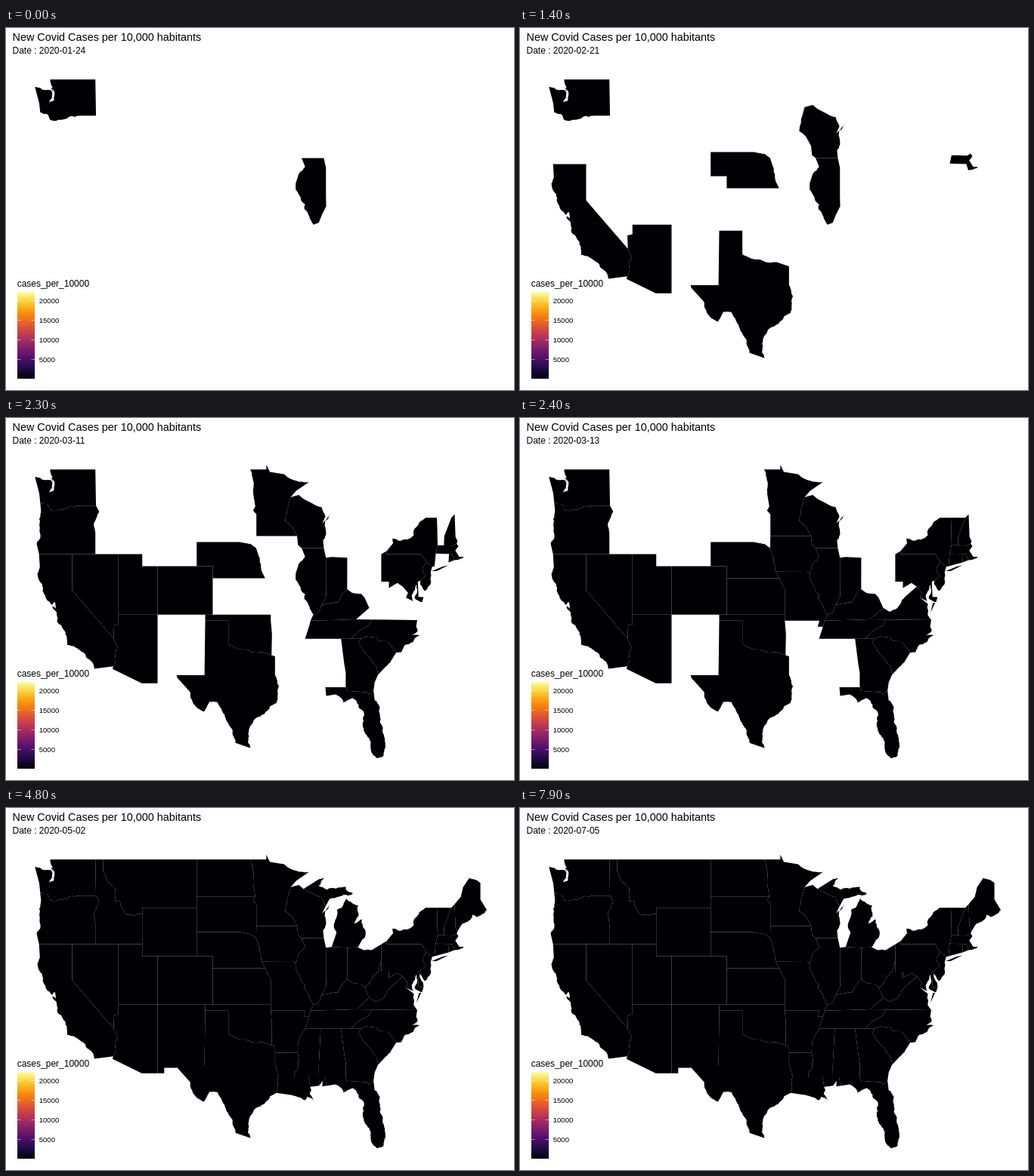
These frames come from a looping animation (672 px wide and 480 px high, 8000 ms). An HTML page:

```html
<!DOCTYPE html>
<html lang="en">
<head>
<meta charset="utf-8">
<title>New Covid Cases per 10,000 habitants</title>
<style>
  html, body { margin: 0; width: 100%; height: 100%; overflow: hidden; background: #fff; }
  svg { display: block; width: 672px; height: 480px; }
  text { font: 12px "Liberation Sans", Arial, sans-serif; fill: #000; }
  .title { font-size: 14.4px; }
  .ticks text { font-size: 9.6px; }
  #map { fill: #000004; }
</style>
</head>
<body>
<svg viewBox="0 0 672 480">
  <defs>
    <linearGradient id="inferno" x1="0" y1="1" x2="0" y2="0">
      <stop offset="0" stop-color="#000004"/>
      <stop offset=".125" stop-color="#210c4a"/>
      <stop offset=".25" stop-color="#57106d"/>
      <stop offset=".375" stop-color="#8a226a"/>
      <stop offset=".5" stop-color="#bc3754"/>
      <stop offset=".625" stop-color="#e45a31"/>
      <stop offset=".75" stop-color="#f98c0a"/>
      <stop offset=".875" stop-color="#f9c932"/>
      <stop offset="1" stop-color="#fcffa4"/>
    </linearGradient>
  </defs>
  <text class="title" x="8.5" y="17">New Covid Cases per 10,000 habitants</text>
  <text id="date" x="8.5" y="34">Date : 2020-01-24</text>
  <g id="map"></g>
  <text x="14.7" y="343">cases_per_10000</text>
  <rect x="15" y="350" width="23" height="115" fill="url(#inferno)"/>
  <g class="ticks" id="ticks"></g>
</svg>
<script>
  // Borders as degrees west and north. Each is given once and shared by its neighbours.
  const west = {
    coastPuget: [122.76,49, 122.5,48.4, 122.2,47.95, 122.4,47.2, 122.9,47.1, 122.5,47.9, 122.7,48.12, 123.5,48.13, 124.72,48.38],
    coastWA: [124.4,47.6, 124.15,46.9],
    isle: [122.7,48.38, 122.4,47.95, 122.5,48.25],
    riverColumbia: [124.05,46.27, 123.2,46.15, 122.76,45.65, 122.2,45.57, 121.2,45.68, 119,46],
    lewis: [116.92,46], waNE: [117,49], idNE: [116.01,49],
    coastOR: [123.95,45.6, 124.1,44.2, 124.5,42.85],
    orCa: [124.2,42], orNv: [119.97,42], orId: [117,42], utNW: [114.05,42],
    riverSnake: [117,43.8, 117.2,44.4, 116.85,45, 116.5,45.5],
    coastCA: [124.1,41, 124.4,40.4, 123.8,39.5, 123.7,38.9, 122.98,38.1, 122.5,37.8, 122.2,38.05, 122.1,37.5, 122.5,37.7, 121.9,36.9, 121.9,36.5, 120.65,35.15, 120.6,34.5, 119.2,34.15, 118.4,33.8, 117.25,32.9],
    caS: [117.12,32.53],
    riverColorado: [114.72,32.72, 114.5,33, 114.53,33.9, 114.15,34.27],
    needle: [114.63,35], tahoe: [119.97,39], mead: [114.7,36.1, 114.05,36.2],
    utSW: [114.05,37], four: [109.05,37], azSE: [109.05,31.33], azS: [111.07,31.33, 114.81,32.5],
    bear: [111.01,42], flame: [111.01,41]
  };
  const plains = {
    coNW: [109.05,41], coNE: [102,41], coSE: [102,37],
    nmNE: [102.96,37], okSW: [102.96,36.5], nmSE: [103.05,32], paso: [106.62,32, 106.53,31.78], heel: [108.2,31.78, 108.2,31.33],
    wyNW: [111.01,45], wyNE: [104.05,45], neW: [104.05,41], neNW: [104.05,43],
    riverBitter: [116.01,48, 114.5,46.65, 114.5,45.55, 113.9,45.6, 113,44.45, 111.01,44.5],
    ndNW: [104.05,49], sdNW: [104.05,45.94], riverRed: [97.23,49, 96.8,46.9], fargo: [96.56,45.94],
    stone: [96.85,45.6, 96.42,45.3], iaNW: [96.42,43.5], sioux: [96.45,42.49],
    riverNE: [97.2,42.85, 98.5,43], riverOmaha: [96.1,41.8, 95.85,40.9], iaSW: [95.75,40.58],
    ksNE: [95.3,40], ksNW: [102,40], kc: [95,39.6, 94.58,39.1],
    okNE: [94.58,37], arNW: [94.58,36.5], okE: [94.43,35.4], okSE: [94.48,33.64],
    riverTX: [95.6,33.9, 96.9,33.88, 98.1,34.13, 100,34.56], pan: [100,36.5]
  };
  const south = {
    txNE: [94.04,33.55], laNW: [94.04,33.02], riverSabine: [94.04,32, 93.55,31.1, 93.7,30.3, 93.85,29.7],
    coastTX: [94.7,29.4, 95.3,28.9, 97.2,27.8, 97.4,26.9, 97.15,25.96],
    riverGrande: [99.1,26.4, 99.5,27.5, 100.3,28.3, 101.4,29.77, 102.4,29.8, 103.1,28.98, 104.5,29.65, 104.9,30.6],
    bootN: [90.15,36.5], bootS: [90.38,36], tnW: [89.7,36], memphis: [90.2,35],
    riverAR: [90.6,34.6, 91.1,33.8], arSE: [91.15,33], riverLA: [90.95,32.4, 91.6,31], pearl: [89.73,31, 89.55,30.2],
    coastLA: [89.4,29.9, 89.6,29.6, 89.1,29.05, 89.9,29.4, 90.2,29.1, 91.3,29.4, 92.2,29.55],
    msNE: [88.2,35], msE: [88.45,31.9, 88.4,30.3], mobile: [88,30.25, 87.95,30.7],
    gaNW: [85.6,35], gaW: [85.18,32.87, 85,32.2], alSE: [85,31], perdido: [87.6,31, 87.5,30.28],
    ncSW: [84.32,35], scNW: [83.1,35], riverSavannah: [83.35,34.7, 81.5,33, 80.88,32.03],
    coastGA: [81.3,31.4], gaS: [81.45,30.71, 82.05,30.36, 82.2,30.57, 84.86,30.7],
    coastFL: [81.3,29.9, 80.55,28.4, 80.03,26.8, 80.2,25.3, 81.1,25.15, 81.8,26.1, 82.7,27.6, 82.65,28.8, 83.6,29.8, 84.1,30.1, 85.3,29.7, 86.3,30.4]
  };
  const lakes = {
    tnNW: [89.5,36.5], cumber: [83.68,36.6], cairo: [89.15,37], riverPaducah: [88.45,37.15], wabash: [88.05,37.8],
    riverOhio: [87,37.95, 86,38, 85.4,38.7], cinci: [84.82,39.1], riverKY: [84.2,38.8, 83,38.7], sandy: [82.6,38.42], kyE: [82,37.55],
    ilNW: [90.64,42.5], ilNE: [87.8,42.5], chicago: [87.53,41.7], inW: [87.53,39.35], riverIN: [87.5,38.5],
    riverIL: [89.5,37.4, 90.3,38.3, 90.2,38.7, 90.7,39, 91.4,39.9], keokuk: [91.4,40.4], riverIA: [91,41.2, 90.2,41.8],
    iaSE: [91.73,40.6], iaNE: [91.22,43.5], dubuque: [91.1,42.75],
    miSW: [86.8,41.76], ohNW: [84.81,41.7], toledo: [83.45,41.73], coastOH: [82.7,41.5, 81.7,41.5],
    duluth: [92.05,46.7], coastWI: [91,46.9], iron: [90.4,46.57], riverWI: [89.1,46.13, 88.1,45.9, 87.6,45.1],
    coastBay: [88,44.55, 87,45.3, 87.6,44.2, 87.9,43.1], riverCroix: [91.9,44.3, 92.75,44.75, 92.3,46.1],
    woods: [95.15,49, 95.15,49.38, 94.7,48.8], riverMN: [92.9,48.6, 91.4,48.07, 89.6,48], coastMN: [91.3,47.25],
    coastUP: [88.4,47.38, 87.8,47.47, 88.45,46.8, 87.4,46.5, 85,46.77, 84.95,46.48, 84.1,46.2, 84.7,46, 87.05,45.75],
    coastMI: [86.2,42.9, 86.5,43.7, 86.1,44.85, 85.5,45, 84.9,45.75, 83.4,45.2, 83.35,44.3, 83.9,43.7, 82.95,44.05, 82.45,43, 82.9,42.35]
  };
  const middle = {
    scN: [82.4,35.2, 81.05,35.1, 80.8,34.82, 79.67,34.8], scE: [78.55,33.86], coastSC: [79.2,33.2, 79.9,32.7],
    coastNC: [77.9,33.9, 77.4,34.5, 76.5,34.7, 75.55,35.25, 76.6,35.3, 75.8,35.65, 76,36], vaSE: [75.87,36.55],
    tnNE: [81.68,36.59], smoky: [82,36.1, 83.5,35.57], paNW: [80.46,41.98], paW: [80.46,40.64], paSW: [80.46,39.72],
    riverWV: [80.85,39.7, 81.75,39, 82.2,38.6], mdW: [79.48,39.72], mdSW: [79.48,39.2], potomac: [78.4,39.62], harper: [77.72,39.32],
    riverShen: [79.3,38.42, 80.3,37.5, 81.2,37.25], mdNE: [75.79,39.72], deSW: [75.7,38.46], deSE: [75.05,38.45],
    coastMD: [75.25,38.02, 76.2,38.4, 76,39.5, 76.5,38.7, 76.35,38.1], bay: [77.3,38.4, 77.04,38.8],
    coastVA: [76.3,36.95, 76.3,37.9], spit: [75.95,37.15, 75.65,37.95, 75.35,38]
  };
  const east = {
    erie: [79.76,42.27], paNE: [79.76,42], delN: [75.35,42], jervis: [74.7,41.36], riverDel: [75.2,40.8, 74.75,40.2],
    deN: [75.45,39.8], coastDE: [75.55,39.45, 75.1,38.8], nyc: [73.95,40.95], coastNJ: [74.15,40.5, 74.1,39.75, 74.9,38.95, 75.5,39.5],
    coastNY: [78.95,42.9, 79.05,43.26, 76.3,43.55, 76.2,44.1, 74.8,45], island: [74,40.6, 72.6,40.97, 71.9,41.07, 73.4,40.6],
    vtNW: [73.35,45], champ: [73.3,44], maNW: [73.26,42.73], ctNW: [73.5,42.05], ctSW: [73.65,41],
    vtNE: [71.5,45], conn: [72.4,43.5], vtSE: [72.46,42.73], nhN: [71.08,45.3], meW: [70.97,43.4], nhE: [70.7,43.08], maNE: [70.82,42.87], nhS: [71.3,42.7],
    meN: [70.3,45.9, 70,46.7, 69.23,47.46, 68.3,47.3, 67.79,47.07, 67.79,45.7],
    coastME: [66.97,44.82, 68.3,44.25, 68.8,44.45, 69.1,44, 70.2,43.6],
    cod: [70.6,42.65, 71,42.3, 70.5,41.78, 70,41.8, 70.2,42.07, 69.95,41.7, 70.65,41.53],
    riE: [71.13,41.5], maRi: [71.38,42.02], riNW: [71.8,42.02], riSW: [71.86,41.32]
  };

  // Outlines by step of first appearance; "-" walks a border backwards, "|" starts another ring.
  const states = {
    0: ['coastPuget coastWA riverColumbia lewis waNE | isle',
      'ilNW ilNE chicago inW riverIN wabash -riverPaducah cairo riverIL keokuk riverIA'],
    1: ['orCa coastCA caS riverColorado needle tahoe orNv',
      'utSW four azSE azS riverColorado needle mead'],
    4: ['maNW vtSE nhS maNE cod riE maRi riNW ctNW'],
    6: ['duluth coastWI iron riverWI coastBay ilNE ilNW dubuque iaNE riverCroix'],
    10: ['okSW pan -riverTX okSE txNE laNW riverSabine coastTX riverGrande -paso nmSE'],
    13: ['neNW -riverNE sioux riverOmaha iaSW ksNE ksNW coNE neW'],
    17: ['utNW bear flame coNW four utSW'],
    18: ['riverColumbia lewis -riverSnake orId orCa -coastOR'],
    20: ['alSE -gaS coastFL -perdido',
      'gaNW ncSW scNW riverSavannah coastGA gaS alSE -gaW',
      'paNE erie coastNY vtNW champ maNW ctNW ctSW nyc jervis delN | island',
      'vtNE nhN meW nhE maNE nhS vtSE -conn',
      'riNW maRi riE riSW'],
    21: ['ncSW scNW scN scE coastNC vaSE tnNE smoky',
      'jervis nyc coastNJ deN -riverDel'],
    22: ['coNW coNE coSE four',
      'mdW mdNE deSW deSE coastMD bay harper potomac mdSW',
      'orNv tahoe needle mead utSW utNW',
      'tnNW cumber tnNE smoky ncSW memphis tnW'],
    23: ['chicago miSW ohNW cinci -riverOhio wabash -riverIN inW',
      'tnNW cairo riverPaducah wabash riverOhio cinci riverKY sandy kyE cumber',
      'riverRed fargo stone iaNW iaNE riverCroix duluth -coastMN -riverMN -woods',
      'nmNE okNE arNW okE okSE riverTX pan okSW',
      'paNW erie paNE delN jervis riverDel deN mdNE paSW paW',
      'scNW scN scE coastSC -riverSavannah'],
    24: ['ksNW ksNE kc okNE coSE',
      'iaSW iaSE keokuk -riverIL cairo tnNW tnW bootS bootN arNW okNE -kc ksNE',
      'vtNW vtNE conn vtSE maNW -champ',
      'cumber tnNE vaSE coastVA bay harper riverShen kyE | spit',
      'ctNW riNW riSW ctSW',
      'iaNW iaNE dubuque ilNW -riverIA keokuk iaSE iaSW -riverOmaha sioux'],
    25: ['laNW arSE riverLA pearl coastLA -riverSabine',
      'ohNW toledo coastOH paNW paW riverWV sandy -riverKY cinci',
      'miSW coastMI toledo ohNW | iron coastUP -riverWI',
      'sdNW fargo stone iaNW sioux riverNE neNW',
      'arNW bootN bootS tnW memphis riverAR arSE laNW txNE okSE okE',
      'deN coastDE deSE deSW mdNE',
      'memphis msNE msE -pearl -riverLA arSE -riverAR',
      'four nmNE okSW nmSE paso heel azSE',
      'ndNW riverRed fargo sdNW',
      'wyNW wyNE neW flame'],
    26: ['nhN meN coastME nhE meW',
      'msNE gaNW gaW alSE perdido mobile -msE',
      'waNE idNE riverBitter bear orId riverSnake lewis',
      'idNE ndNW wyNE wyNW -riverBitter'],
    27: ['paW paSW mdW mdSW potomac harper riverShen kyE sandy -riverWV']
  };

  const LOOP = 8000, STEP = 100, DAYS_PER_STEP = 2.07;
  const start = Date.UTC(2020, 0, 24);
  const $ = id => document.getElementById(id);
  const borders = { ...west, ...plains, ...south, ...lakes, ...middle, ...east };

  const project = (lon, lat) => [1329.17 - 10.35 * lon, 854.16 - 16.04 * lat];
  const noise = (x, y) => {
    const v = Math.sin(x * 12.9898 + y * 78.233) * 43758.5453;
    return v - Math.floor(v) - .5;
  };

  // Midpoint displacement: the points after a, up to and including b.
  function roughen(a, b, amount) {
    const dx = b[0] - a[0], dy = b[1] - a[1];
    if (Math.hypot(dx, dy) < 3) return [b];
    const x = (a[0] + b[0]) / 2, y = (a[1] + b[1]) / 2;
    const k = amount * noise(x, y);
    const mid = [x - dy * k, y + dx * k];
    return [...roughen(a, mid, amount), ...roughen(mid, b, amount)];
  }

  function trace(name) {
    const list = borders[name], pts = [];
    for (let i = 0; i < list.length; i += 2) pts.push(project(list[i], list[i + 1]));
    const amount = name.startsWith('coast') ? .3 : name.startsWith('river') ? .22 : 0;
    return amount ? pts.flatMap((p, i) => i ? roughen(pts[i - 1], p, amount) : [p]) : pts;
  }

  const ring = names => 'M' + names.trim().split(' ').flatMap(n =>
    n[0] === '-' ? trace(n.slice(1)).reverse() : trace(n)
  ).map(p => p.map(v => v.toFixed(2))).join(' ') + 'Z';

  $('map').innerHTML = Object.entries(states).map(([step, list]) =>
    `<g data-step="${step}">` +
    list.map(s => `<path d="${s.split('|').map(ring).join('')}"/>`).join('') + '</g>'
  ).join('');

  $('ticks').innerHTML = [20000, 15000, 10000, 5000].map((n, i) => {
    const y = 361.5 + 26 * i;
    return `<path d="M15 ${y}h4.6m13.8 0h4.6" stroke="#fff" stroke-width=".5"/>` +
      `<text x="43.7" y="${y + 3.5}">${n}</text>`;
  }).join('');

  const groups = [...document.querySelectorAll('[data-step]')];
  let shown = -1;

  function draw(now) {
    const step = Math.floor(now % LOOP / STEP);
    if (step !== shown) {
      shown = step;
      const day = new Date(start + Math.floor(step * DAYS_PER_STEP) * 864e5);
      $('date').textContent = 'Date : ' + day.toISOString().slice(0, 10);
      for (const g of groups) g.style.display = step >= +g.dataset.step ? '' : 'none';
    }
    requestAnimationFrame(draw);
  }
  draw(performance.now());
</script>
</body>
</html>
```
